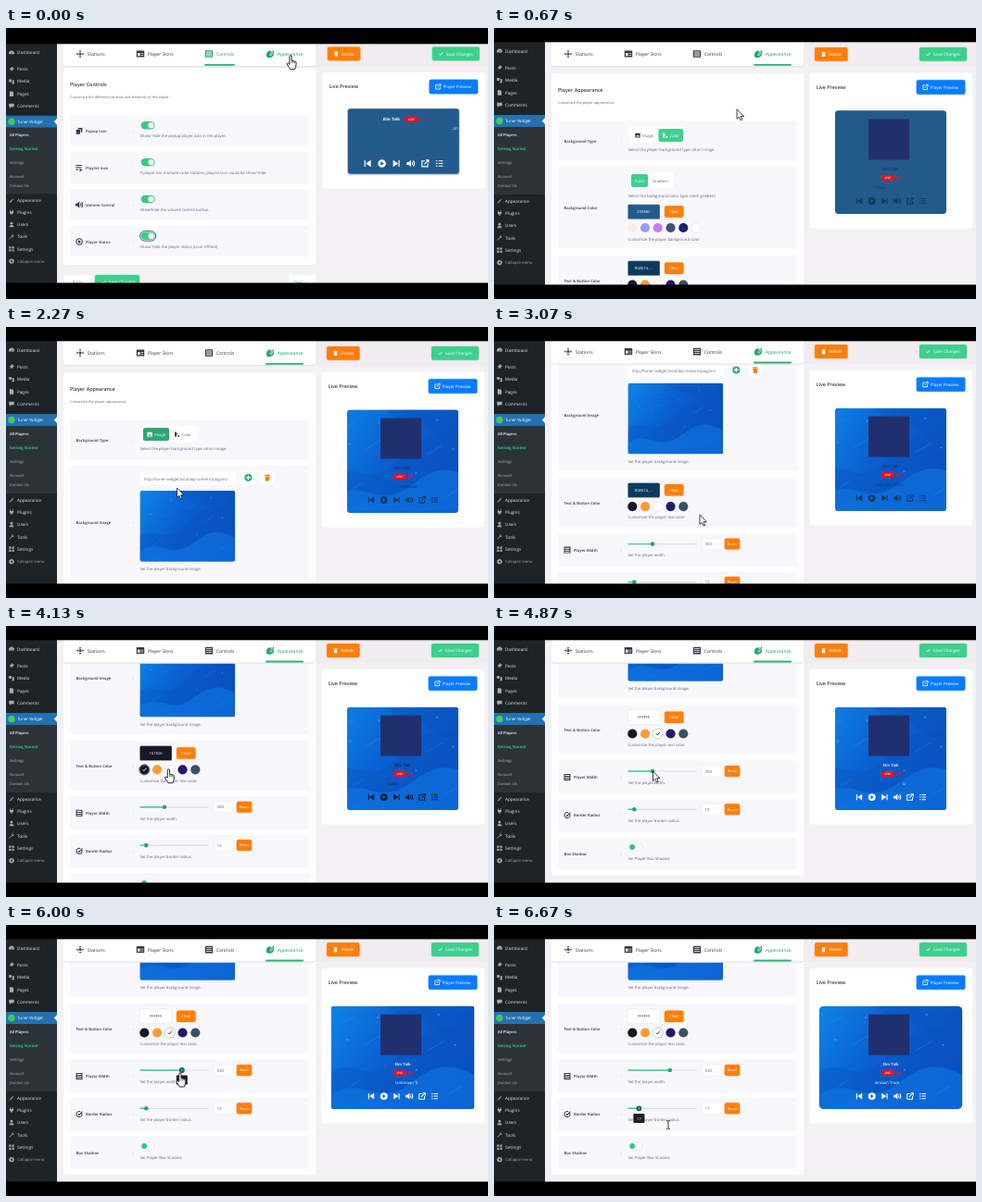
An HTML page for the animation above (6740 ms loop, 520x293 px).

```html
<!DOCTYPE html>
<html lang="en">
<head>
<meta charset="utf-8">
<title>Player appearance settings</title>
<style>
  html, body { margin: 0; width: 100%; height: 100%; overflow: hidden; background: #000; }
  svg { display: block; }
  #stage { width: 100vw; height: 100vh; font-family: "Open Sans", "Noto Sans", sans-serif; text-rendering: geometricPrecision; }
  .line { fill: none; stroke: currentColor; stroke-width: 1.1; }
</style>
</head>
<body>
<svg id="stage" viewBox="0 0 520 293">
  <defs>
    <linearGradient id="sea" x2="1" y2=".45">
      <stop stop-color="#0e84e6"/><stop offset=".5" stop-color="#0a5fd0"/><stop offset="1" stop-color="#0a50c2"/>
    </linearGradient>
    <g id="art">
      <rect width="104" height="78" fill="url(#sea)"/>
      <path d="M0 50C18 38 24 58 42 44S66 12 104 20V44C84 38 78 62 58 62S24 70 0 78Z" fill="#0850b8" opacity=".35"/>
      <path d="M0 66C22 52 34 74 54 60S82 40 104 52V78H0Z" fill="#1180ea" opacity=".45"/>
      <path d="M40 0C48 14 62 6 72 16S92 26 104 18V0Z" fill="#0850b4" opacity=".3"/>
      <path d="M8 14l9-5M24 30l12-7M70 34l12-7M84 66l10-6M14 60l8-5M52 20l7-4" stroke="#3ba4f5" stroke-width=".6" opacity=".35"/>
      <g fill="#55b4ff" opacity=".5"><circle cx="12" cy="26" r=".8"/><circle cx="34" cy="10" r=".8"/><circle cx="62" cy="48" r=".8"/><circle cx="90" cy="30" r=".8"/><circle cx="78" cy="8" r=".8"/></g>
    </g>
  </defs>
  <g id="scene"></g>
</svg>
<script>
const LOOP = 6740, STEP = 66.7;
const GREEN = '#3ecf8e', ORANGE = '#ff7f0a', INK = '#36364a', SOFT = '#62627a', ROW = '#f8f8fc';
const STATION = 'Elm Talk', PLUGIN = 'Tuner Widget';

// Moments at which the interface switches state
const OPEN_TAB = 350, PICK_BG = 1330, PICK_IMAGE = 1900, PICK_BLACK = 3500, PICK_WHITE = 4270;
const DRAG_WIDTH = 5100, DRAG_RADIUS = 6170;
const SCROLL_TICKS = [2400, 2600, 2800, 3200, 4650];

const POINTER = [[0, 307, 30], [300, 306, 31], [1300, 162, 217], [1560, 163, 217], [1850, 163, 116], [1960, 163, 116],
  [2270, 184.5, 174], [3070, 222, 203], [3400, 149, 155], [3800, 149, 155], [4130, 178, 155], [4450, 178, 156],
  [4950, 171, 157], [5200, 168, 158], [5400, 178, 159], [5900, 190, 158], [6150, 151, 198], [6450, 156, 199], [6670, 188, 216]];
const POINTER_KIND = [[0, 'hand'], [450, 'arrow'], [1250, 'hand'], [1600, 'arrow'], [1780, 'hand'], [2030, 'arrow'],
  [3350, 'hand'], [4450, 'arrow'], [4900, 'hand'], [6000, 'arrow'], [6120, 'hand'], [6520, 'beam']];

const clamp = v => Math.max(0, Math.min(1, v));
const ease = v => v * v * (3 - 2 * v);
function tween(keys, t) {
  const i = keys.findIndex(k => k[0] > t);
  if (i < 0) return keys[keys.length - 1].slice(1);
  const a = keys[i - 1], b = keys[i], p = ease((t - a[0]) / (b[0] - a[0]));
  return a.slice(1).map((v, n) => v + (b[n + 1] - v) * p);
}

const rect = (x, y, w, h, fill, r = 0, more = '') =>
  `<rect x="${x}" y="${y}" width="${w}" height="${h}" rx="${r}" fill="${fill}" ${more}/>`;
const circle = (x, y, r, fill, more = '') => `<circle cx="${x}" cy="${y}" r="${r}" fill="${fill}" ${more}/>`;
const text = (x, y, s, size = 4.25, fill = SOFT, weight = 400, anchor = 'start') =>
  `<text x="${x}" y="${y + size * .36}" font-size="${size}" fill="${fill}" font-weight="${weight}" text-anchor="${anchor}">${s}</text>`;
const mid = (x, y, s, size, fill, weight) => text(x, y, s, size, fill, weight, 'middle');
const move = (x, y, body) => `<g transform="translate(${x} ${y})">${body}</g>`;
const fillPath = d => `<path fill-rule="evenodd" d="${d}"/>`;
const linePath = d => `<path class="line" d="${d}"/>`;

const ICONS = {
  prev: fillPath('M-3.5-3.5h1.2v7h-1.2zM3.5-3.7v7.4L-2 0z'),
  next: fillPath('M3.5-3.5h-1.2v7h1.2zM-3.5-3.7v7.4L2 0z'),
  play: fillPath('M-4.3 0a4.3 4.3 0 1 0 8.6 0a4.3 4.3 0 1 0-8.6 0M-1.4-2.3L2.4 0L-1.4 2.3z'),
  status: circle(0, 0, 3.4, 'none', 'class="line"') + circle(0, 0, 1.6, 'currentColor'),
  volume: fillPath('M-4.3-1.5h2l2.6-2.3v7.6l-2.6-2.3h-2z') + linePath('M1.5-1.5q1.2 1.5 0 3M2.7-3.2q2.6 3.2 0 6.4'),
  open: linePath('M0-2.8h-3.3v6.2h6.2V0M-.8.8L3.4-3.4M.8-3.7h3v3'),
  list: linePath('M-3.8-2.8h1.6M-3.8 0h1.6M-3.8 2.8h1.6M-1-2.8h4.8M-1 0h4.8M-1 2.8h4.8'),
  playlist: linePath('M-3.8-2.8h6.6M-3.8-.4h6.6M-3.8 2h3') + fillPath('M.6.6L3.8 2.4.6 4.2z'),
  trash: fillPath('M-2.4-1.4h4.8l-.4 5h-4zM-3-2.8h6v.9h-6zM-1-3.5h2v.7h-2z'),
  check: linePath('M-2.4 0l1.7 1.8L2.6-2'),
  plus: fillPath('M-4 0a4 4 0 1 0 8 0a4 4 0 1 0-8 0M-.6-2.3h1.2v1.7h1.7v1.2h-1.7v1.7h-1.2v-1.7h-1.7v-1.2h1.7z'),
  burst: circle(0, 0, 1.5, 'currentColor') + fillPath('M-1.4-2.4L0-4.2 1.4-2.4zM-1.4 2.4L0 4.2 1.4 2.4zM-2.4-1.4L-4.2 0-2.4 1.4zM2.4-1.4L4.2 0 2.4 1.4z'),
  card: fillPath('M-4.2-3.5h8.4v7h-8.4zM-3-1h2.6v3.2H-3zM.6-.8h2.6v.8H.6zM.6 1.2h2.6V2H.6z'),
  sliders: fillPath('M-4-3.8h8v7.6h-8zM-3-2.4v.8h6v-.8zM-3-.4v.8h6v-.8zM-3 1.6v.8h6v-.8z'),
  paint: fillPath('M-4 .4a3.8 3.8 0 0 1 5.5-3.4L-.6 1l1.4 1.2L4-2.4Q4.6 4-.2 4.2T-4 .4z') + linePath('M0 1L4-4'),
  page: fillPath('M-2.5-3.3h3.7l1.3 1.3v5.3h-5z'),
  pin: fillPath('M.4-3.4l3 3-1.6.6-1.2 2.2L-1 .8-3.5 3.3-1.3.4-2.6-.9l2.3-1z'),
  media: fillPath('M-3.3-2.8h3.2v3.5h-3.2zM.6-1.5h2.7v4.6H.4V1.4h.9V-.2H.6z'),
  bubble: fillPath('M-3.2-2.7h6.4v4.3h-3.4l-2 1.9V1.6h-1z'),
  gauge: fillPath('M-3.3 1.8a3.5 3.5 0 1 1 6.6 0zM-.4.8l2-2.4L.5 1z'),
  brush: fillPath('M3.3-3.3L.5.8-.7-.2zM-1-.1L.2 1Q-.4 3.2-3.2 3-1.8 2-1-.1z'),
  plug: fillPath('M-1.9-3.2h.9v2h2v-2h.9v2h.8q0 3-2.1 3.4v1.2h-1.2V2.2Q-2.7 1.8-2.7-1.2h.8z'),
  user: circle(0, -1.6, 1.7, 'currentColor') + fillPath('M-3 3.2Q-2.8.5 0 .5T3 3.2z'),
  tool: linePath('M-2.8 2.8L1 -1') + fillPath('M.1-1.5Q.3-3.4 2.3-3.2L1.3-2 2.2-1l1-1Q3.4.2 1.3.1z'),
  grid: fillPath('M-3.2-3.2h2.6v2.6h-2.6zM.6-3.2h2.6v2.6H.6zM-3.2.6h2.6v2.6h-2.6zM.6.6h2.6v2.6H.6z'),
  back: fillPath('M-3.2 0a3.2 3.2 0 1 0 6.4 0a3.2 3.2 0 1 0-6.4 0M1-1.9v3.8L-1.6 0z'),
  popup: fillPath('M-3.5-1.5h4.5v5h-4.5zM-1.5-3.5h5v5h-1.7v-3.3h-3.3z'),
  width: fillPath('M-3.7-3.7h7.4v7.4h-7.4zM-2.6-2.6v1.1h5.2v-1.1zM-2.6-.3v1h5.2v-1zM-2.6 1.8v.9h5.2v-.9z'),
  target: linePath('M2.9-1.4A3.2 3.2 0 1 1 1.2-3M-1.2-.2L0 1l3.5-4.2'),
  picture: fillPath('M-2.8-2.5h5.6v5h-5.6zM-2 1.7h4L.6-.6-.5.7-1.1.1z'),
  palette: fillPath('M-2.6-2.7h2v5.4h-2zM0-1.7L1.2-.5 0 1zM1.4 1h1.4v1.7H0z'),
};
const icon = (name, x, y, color, scale = 1) =>
  `<g transform="translate(${x} ${y}) scale(${scale})" color="${color}" fill="${color}">${ICONS[name]}</g>`;

const CURSORS = {
  hand: '<path d="M-1.1 1q0-1.2 1.1-1.2T1.2 1v4.3l4 .9q1.1.3 1 1.5-.1 4-1.7 7H-.4q-1.2-2.5-3-4.6-1-1.4.1-2 1-.4 2.2 1z" fill="#fff" stroke="#111" stroke-width=".9"/><path d="M1.2 8V6M2.9 8.2V6.2M4.5 8.4v-2" stroke="#111" stroke-width=".6"/>',
  arrow: '<path d="M0 0v10.5l2.4-2.2 1.7 3.8 1.7-.8-1.7-3.6h3.3z" fill="#fff" stroke="#111" stroke-width=".8"/>',
  beam: '<path d="M-2-4.5q2 0 2 1v7q0 1-2 1M2-4.5q-2 0-2 1m0 7q0 1 2 1" fill="none" stroke="#222" stroke-width=".9"/>',
};

const button = (x, y, w, h, fill, label, size, glyph) =>
  rect(x, y, w, h, fill, 2, `stroke="${fill}" stroke-opacity=".25" stroke-width="1.4"`) +
  (glyph ? icon(glyph, x + 9.5, y + h / 2, '#fff', .75) + text(x + 15, y + h / 2, label, size, '#fff') : mid(x + w / 2, y + h / 2, label, size, '#fff'));

function sidebar() {
  const item = (y, label, glyph) => icon(glyph, 6, y, '#a7aaad', .85) + text(12, y, label, 4.65, '#e8e9ea');
  const sub = (y, label, color = '#b4b9be', weight = 400) => text(4, y, label, 4.1, color, weight);
  const items = [[25, 'Dashboard', 'gauge'], [43, 'Posts', 'pin'], [56.5, 'Media', 'media'], [70, 'Pages', 'page'],
    [83, 'Comments', 'bubble'], [187, 'Appearance', 'brush'], [200, 'Plugins', 'plug'], [213.5, 'Users', 'user'],
    [227, 'Tools', 'tool'], [240.3, 'Settings', 'grid']];
  return rect(0, 0, 55, 293, '#1d2327') + rect(0, 107, 55, 73, '#2c3338') + rect(0, 94, 55, 13, '#2271b1') +
    `<path d="M55 97v7l-3.2-3.5z" fill="#f4f1f5"/>` + circle(6, 100.5, 3.7, '#45c95a') + text(12, 100.5, PLUGIN, 4.5, '#fff') +
    items.map(i => item(...i)).join('') + icon('back', 6, 253.7, '#a7aaad', .85) + text(12, 253.7, 'Collapse menu', 4.25, '#a7aaad') +
    sub(115.5, 'All Players', '#fff', 600) + sub(130.7, 'Getting Started', '#3ddc84', 600) +
    sub(145.5, 'Settings') + sub(161, 'Account') + sub(171, 'Contact Us');
}

// The last tab stays green: it is either hovered or active
function tabs(active, dy) {
  const list = [['Stations', 80, 'burst', 106], ['Player Skins', 145, 'card', 181],
    ['Controls', 219, 'sliders', 246], ['Appearance', 285, 'paint', 320]];
  return move(0, dy, rect(62, 10, 272, 32.2, '#e5e2ea', 3) + rect(62, 10, 272, 31, '#fff', 3) +
    list.map(([name, x, glyph, end]) => {
      const on = name === active, green = on || name === 'Appearance';
      return icon(glyph, x, 28, green ? '#22a96c' : INK) + text(x + 7.8, 28.3, name, 5, green ? '#1f9d63' : INK, 500) +
        (on ? rect(x - 5, 39, end - x + 6, 1.8, '#2fae74', .8) : '');
    }).join(''));
}

const rowLabel = (y, label, glyph) => (glyph ? icon(glyph, 79, y, INK, .95) : '') +
  text(glyph ? 86 : 75.5, y, label, 4.2, INK, 600) + text(136.5, y, ':', 4.2, SOFT);
const row = (y, h, label, glyph, labelY = y + h / 2) => rect(69, y, 258, h, ROW, 3) + rowLabel(labelY, label, glyph);
const title = (y, name, note) => text(69, y, name, 5.4, INK, 600) + text(69, y + 13.8, note, 3.85);

function controlsPage() {
  const rows = [['Popup Icon', 'popup', 'Show/ hide the popup player icon in the player.'],
    ['Playlist Icon', 'playlist', 'If player has multiple radio stations, playlist icon could be show/ hide.'],
    ['Volume Control', 'volume', 'Show/hide the volume control button.'],
    ['Player Status', 'status', 'Show/ hide the player status (Live/ Offline)']];
  return rect(62, 43.5, 272, 212.5, '#fff', 3) + title(61.2, 'Player Controls', 'Customize the different controls and elements of the player.') +
    rows.map(([name, glyph, help], i) => {
      const y = 94.3 + i * 39.9;
      const focus = i === 3 ? rect(144.5, y + 5.6, 17.2, 10.6, 'none', 5.3, 'stroke="#2c6a72" stroke-width="1"') : '';
      return row(y, 34, name, glyph) + focus + rect(145.6, y + 6.7, 15, 8.4, '#3cc985', 4.2) +
        circle(156.5, y + 10.9, 3.1, '#fff') + text(144.5, y + 22.6, help);
    }).join('') +
    rect(62, 267, 29, 15, '#fff', 2) + text(69, 274.5, '‹  Back', 4.5, '#5fbf95') +
    button(96, 267, 48, 15, GREEN, 'Save Changes', 4.5, 'check') +
    rect(305, 267, 29, 15, '#fff', 2) + text(311, 274.5, 'Next  ›', 4.5, '#5fbf95');
}

function swatches(y, colors, selected) {
  return colors.map((c, i) => {
    const x = 149.3 + i * 13.75, on = i === selected;
    return circle(x, y, 5.1, c, c === '#ffffff' ? 'stroke="#dddde6" stroke-width=".6"' : '') +
      (on ? circle(x, y, 5.6, 'none', `stroke="${c === '#ffffff' ? '#c8c8d4' : '#33335a'}" stroke-width=".8"`) +
        icon('check', x, y, i === 0 ? '#fff' : '#222', .8) : '');
  }).join('');
}
const colorField = (y, fill, label, ink) => rect(144.3, y, 34.7, 16, fill, 1.5, 'stroke="#d6d6de" stroke-width=".4"') +
  mid(161.5, y + 8.2, label, 4.1, ink) + button(184, y + 1.6, 20.5, 12.5, ORANGE, 'Clear', 4.2);

function slider(y, x, value, focused) {
  return rect(144.3, y - .6, 74, 1.2, '#d9dbe3', .6) + rect(144.3, y - .7, x - 144.3, 1.4, GREEN, .7) +
    circle(x, y, 2.3, '#23a56d', focused ? 'stroke="#174c5c" stroke-width="1.2"' : '') +
    rect(224.2, y - 6, 21, 12, '#fff', 1.5, 'stroke="#e6e6ee" stroke-width=".5"') + text(227.5, y, value, 4.4) +
    button(248.8, y - 6, 16.3, 12, ORANGE, 'Reset', 3.8) +
    text(144.5, y + 12.2, y < 360 ? 'Set the player width.' : 'Set the player border radius.') +
    (focused ? rect(x - 6, y + 5.6, 12, 10, '#1c1c20', 1) + mid(x, y + 10.8, value, 4, '#fff') : '');
}

function backgroundImage() {
  return row(150, 122, 'Background Image', null, 211.5) +
    rect(144.3, 156.5, 104, 14.5, '#fff', 1.5) +
    `<svg x="148.5" y="157" width="96" height="14">${text(0, 7, 'http://tuner-widget.local/wp-content/plugins/', 4.3)}</svg>` +
    rect(253, 155.5, 16.5, 14.5, '#fff', 2) + icon('plus', 261.3, 162.8, '#27b173') +
    rect(274, 155.5, 15.5, 14.5, '#fff', 2) + icon('trash', 281.8, 162.8, ORANGE) +
    picture(144.3, 176.8, 103, 77, 3, 'thumb') + text(144.5, 261.8, 'Set the player background image.');
}

function backgroundColor(t) {
  const picked = t >= PICK_BG;
  return row(150, 89, 'Background Color') + rect(146, 156, 48, 17, '#fff', 2) + rect(148, 158, 18, 14, GREEN, 2) +
    mid(157, 165, 'Solid', 4.3, '#fff') + mid(179.5, 165, 'Gradient', 4.2, SOFT) +
    text(144.5, 181, 'Select the background color type solid/ gradient.') +
    colorField(190.7, picked ? '#9c9bfe' : '#235a8c', picked ? '9C9BFE' : '235A8C', picked ? '#222' : '#fff') +
    swatches(216, ['#f8eee8', '#9c9bfe', '#c77cf2', '#40506e', '#231d70', '#ffffff'], picked ? 1 : -1) +
    text(144.5, 228, 'Customize the player background color.');
}

function appearancePage(t, s) {
  const image = t >= PICK_IMAGE;
  const option = (x, w, on, glyph, label) => (on ? rect(x, 109, w, 14, image ? '#2ea872' : GREEN, 2) : '') +
    icon(glyph, x + 7, 116, on ? '#fff' : '#333', .95) + text(x + 12, 116.2, label, 4.2, on ? '#fff' : SOFT);
  const lower = row(279, 54, 'Text &amp; Button Color', null, 306.7) +
    colorField(284.8, s.ink, s.inkName, s.ink === '#ffffff' ? '#333' : '#fff') +
    swatches(310.5, ['#161826', '#ff9a35', '#ffffff', '#231a70', '#365069'], s.inkIndex) +
    text(144.5, 322.3, 'Customize the player text color.') +
    row(339.5, 36, 'Player Width', 'width', 357.5) + slider(351, 144.8 + (s.width - 100) * .1046, s.width, t >= DRAG_WIDTH && t < DRAG_RADIUS) +
    row(381, 36, 'Border Radius', 'target', 398.5) + slider(392.3, 144 + s.radius * .73, s.radius, t >= DRAG_RADIUS) +
    row(422.5, 35, 'Box Shadow') + rect(145.3, 429, 15, 8, '#fff', 4, 'stroke="#dcdce4" stroke-width=".6"') +
    circle(149.2, 433, 2.9, '#33c282') + text(144.5, 445, 'Set Player Box Shadow');
  return move(0, -s.scroll, rect(62, 49, 272, image ? 415 : 382, '#fff', 3) +
    title(67, 'Player Appearance', 'Customize the player appearance.') +
    row(100.5, 43, 'Background Type') + rect(146, 106.5, 61, 18, '#fff', 2) +
    option(148, 28, image, 'picture', 'Image') + option(177.5, 26.5, !image, 'palette', 'Color') +
    text(144.5, 131.8, 'Select the player background type color/ image.') +
    (image ? backgroundImage() : backgroundColor(t)) + move(0, image ? 0 : -33, lower));
}

function picture(x, y, w, h, r, id) {
  return `<clipPath id="${id}">${rect(x, y, w, h, '#000', r)}</clipPath><g clip-path="url(#${id})">
    <svg x="${x}" y="${y}" width="${w}" height="${h}" viewBox="0 0 104 78" preserveAspectRatio="xMidYMid slice"><use href="#art"/></svg></g>`;
}
const ticker = (left, y, width, x, color) =>
  `<svg x="${left}" y="${y - 4}" width="${width}" height="8">${text(x - left, 4, 'Unknown Track', 4.4, color)}</svg>`;
const liveBadge = (x, y) => rect(x, y - 3, 13.5, 6, '#e8121c', .6) + mid(x + 6.75, y, 'LIVE', 3.2, '#fff', 600) +
  circle(x + 18.3, y, 1.1, '#d8202a') + `<path d="M${x + 16.5} ${y - 2}q-1 2 0 4m3.6-4q1 2 0 4" stroke="#d8202a" stroke-width=".6" fill="none"/>`;
const transport = (x, gap, y, color, scale) =>
  ['prev', 'play', 'next', 'volume', 'open', 'list'].map((n, i) => icon(n, x + i * gap, y, color, scale)).join('');

function smallPlayer(t) {
  return rect(367.2, 87.2, 121.6, 72.6, '#c9d3de', 3.5) + rect(368, 87.8, 120, 70.5, '#235a8c', 3) +
    text(406, 98.8, STATION, 4.4, '#fff', 700) + liveBadge(430, 99) +
    ticker(370, 109, 117, 481 - t * .0194, '#fff') + transport(389.3, 15.5, 147, '#fff', 1);
}

function tallPlayer(t, s) {
  const w = Math.min(155, s.width * .343), x = 428 - w / 2, r = s.radius * .343;
  const drift = (3 + (t - 1470) * .0194 + 66) % 66;
  return (t >= PICK_IMAGE ? picture(x, 89.3, w, 111.7, r, 'cover') : rect(x, 89.3, w, 111.7, t >= PICK_BG ? '#9c9bfe' : '#235a8c', r)) +
    rect(404, 98.5, 44, 44, '#20306f') + mid(428, 152.5, STATION, 4.3, s.ink, 600) + liveBadge(418, 162) +
    ticker(411, 172, 33, 444 - drift, s.ink) + transport(394, 13.7, 187, s.ink, .92);
}

function rightColumn(t, s, opened) {
  return move(opened ? 0 : .8, opened ? s.shift : -.5, button(346, 21, 35.5, 14.8, ORANGE, 'Delete', 4.6, 'trash') +
    button(459, 21, 51, 14.8, GREEN, 'Save Changes', 4.5, 'check') +
    rect(340.6, 48.5, 175.6, opened ? 168 : 125.5, '#fff', 3) + text(347.7, 64, 'Live Preview', 5.3, INK, 600) +
    button(455.8, 56.3, 52.5, 15.4, '#0a7bff', 'Player Preview', 4.5, 'open') + (opened ? tallPlayer(t, s) : smallPlayer(t)));
}

function scene(t) {
  const opened = t >= OPEN_TAB;
  const scroll = SCROLL_TICKS.reduce((sum, at) => sum + 38.8 * ease(clamp((t - at) / 130)), 0);
  const [ink, inkName, inkIndex] = t >= PICK_WHITE ? ['#ffffff', 'FFFFFF', 2] :
    t >= PICK_BLACK ? ['#161826', '161826', 0] : ['#0e395f', 'RGB(14, …', -1];
  const state = {
    scroll, ink, inkName, inkIndex, shift: -1.9 * clamp(scroll / 39),
    width: Math.round(tween([[0, 350], [DRAG_WIDTH, 350], [5330, 305], [5420, 305], [5950, 530]], t)[0]),
    radius: Math.round(tween([[0, 10], [DRAG_RADIUS, 10], [6450, 17]], t)[0]),
  };
  const kind = POINTER_KIND.filter(k => k[0] <= t).pop()[1];
  const squeeze = opened ? '' : 'translate(0 2.2) scale(1 .985)';
  const bars = rect(0, -5, 520, 20.3, '#000') + rect(0, 277.5, 520, 30, '#000');
  return rect(0, 0, 520, 293, '#f4f1f5') + rect(334, 0, 186, 42 + state.shift, '#f0ecef') +
    (opened ? appearancePage(t, state) : controlsPage()) +
    tabs(opened ? 'Appearance' : 'Controls', state.shift * .75) + rightColumn(t, state, opened) +
    `<g transform="${squeeze}">${sidebar()}</g>` + move(...tween(POINTER, t), CURSORS[kind]) +
    `<g transform="${squeeze}">${bars}</g>`;
}

const root = document.getElementById('scene');
const start = performance.now();
let shown = -1;
function play() {
  const step = Math.floor((performance.now() - start) % LOOP / STEP);
  if (step !== shown) root.innerHTML = scene((shown = step) * STEP);
  requestAnimationFrame(play);
}
play();
</script>
</body>
</html>
```
